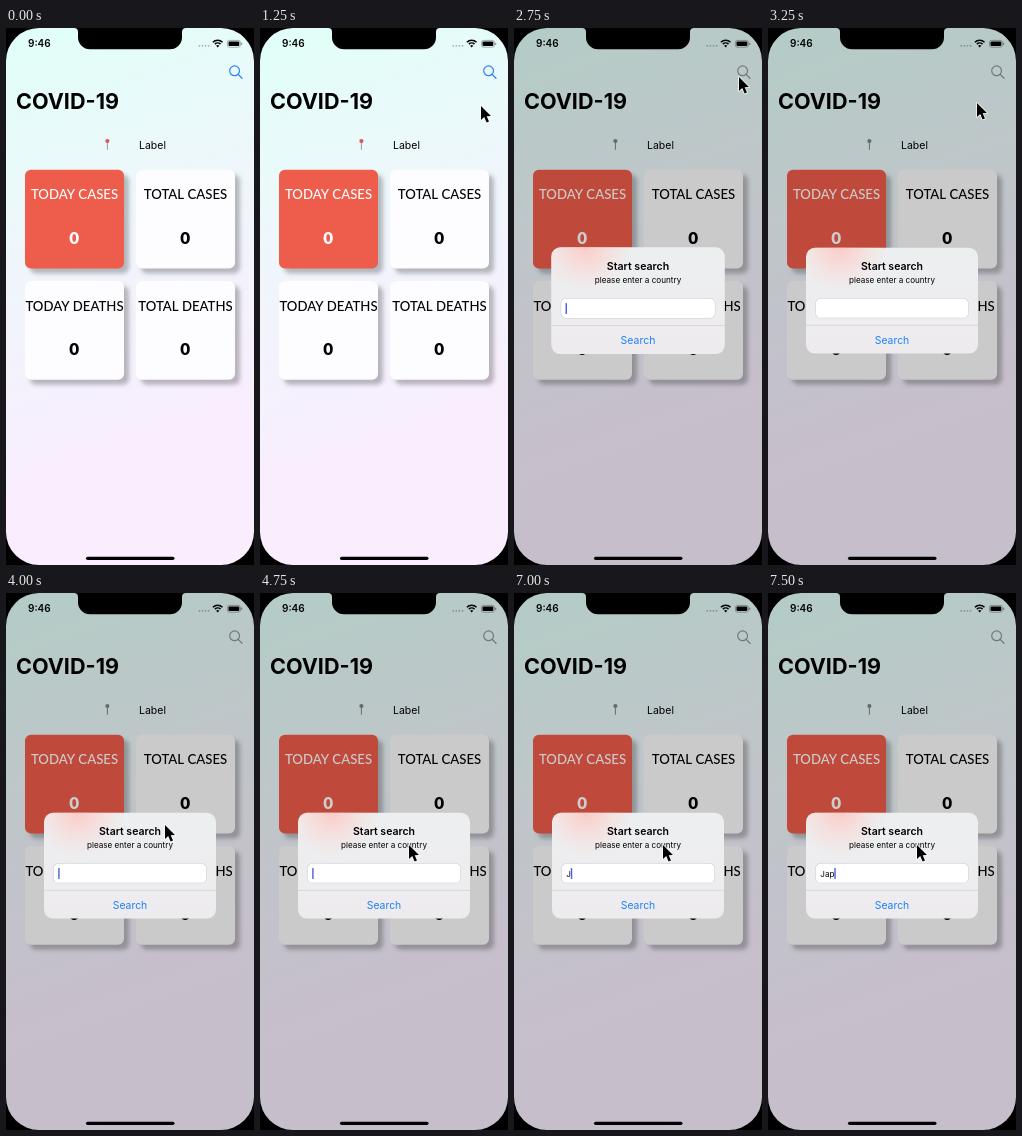
These frames come from a looping animation (248 by 537 pixels, 8 s). An HTML page with a canvas:

```html
<!DOCTYPE html>
<html lang="en">
<head>
<meta charset="utf-8">
<title>Case counter</title>
<style>
  html, body { margin: 0; width: 100%; height: 100%; overflow: hidden; background: #000; }
  canvas { display: block; width: 248px; height: 537px; }
</style>
</head>
<body>
<canvas id="stage"></canvas>
<script>
const W = 248, H = 537, LOOP = 8000, TICK = 250;
const canvas = document.getElementById('stage');
const ctx = canvas.getContext('2d');
const ratio = window.devicePixelRatio || 1;
canvas.width = W * ratio;
canvas.height = H * ratio;

const SANS = 'Inter, Roboto, sans-serif';
const GEOMETRIC = 'Lato, Inter, sans-serif';
const BLUE = '#1a82fb';

// time, x, y of the pointer tip
const POINTER = [
  [750, 196, 300], [1000, 208, 165], [1250, 221, 78], [1500, 225, 52], [1750, 225, 49],
  [3000, 221, 56], [3250, 209, 75], [3500, 203, 83], [3750, 201, 86],
  [4000, 159, 232], [4250, 152, 246], [4500, 149, 252]
];
const KEYS = [[7000, 'J'], [7250, 'Ja'], [7500, 'Jap']];

const latest = (list, t) => list.filter(item => item[0] <= t).pop();

function text(str, x, y, font, color = '#000', align = 'left') {
  ctx.font = font;
  ctx.fillStyle = color;
  ctx.textAlign = align;
  ctx.fillText(str, x, y);
}

function box(x, y, w, h, r, fill) {
  ctx.beginPath();
  ctx.roundRect(x, y, w, h, r);
  ctx.fillStyle = fill;
  ctx.fill();
}

function disc(x, y, r, fill) {
  ctx.beginPath();
  ctx.arc(x, y, r, 0, 7);
  ctx.fillStyle = fill;
  ctx.fill();
}

function line(x1, y1, x2, y2, color, width) {
  ctx.beginPath();
  ctx.moveTo(x1, y1);
  ctx.lineTo(x2, y2);
  ctx.strokeStyle = color;
  ctx.lineWidth = width;
  ctx.stroke();
}

function background() {
  const g = ctx.createLinearGradient(0, 0, 150, 420);
  g.addColorStop(0, '#e0fff8');
  g.addColorStop(0.45, '#eef7fb');
  g.addColorStop(1, '#f9edfe');
  ctx.fillStyle = g;
  ctx.fillRect(0, 0, W, H);
}

function statusBar() {
  text('9:46', 22, 19.3, `600 10px ${SANS}`);
  for (let i = 0; i < 4; i++) disc(193.3 + i * 3.1, 17.8, 0.9, '#a3afb2');
  ctx.strokeStyle = '#000';
  ctx.lineWidth = 1.6;
  for (const r of [4, 6.8]) {
    ctx.beginPath();
    ctx.arc(211.7, 19, r, -Math.PI * 0.75, -Math.PI * 0.25);
    ctx.stroke();
  }
  ctx.beginPath();
  ctx.moveTo(211.7, 19.4);
  ctx.arc(211.7, 19.4, 2.2, -Math.PI * 0.75, -Math.PI * 0.25);
  ctx.fillStyle = '#000';
  ctx.fill();
  ctx.beginPath();
  ctx.roundRect(221.4, 12.4, 13, 6.8, 2);
  ctx.strokeStyle = '#838b8c';
  ctx.lineWidth = 0.7;
  ctx.stroke();
  box(222.5, 13.5, 10.8, 4.6, 1, '#000');
  box(235.2, 14.5, 1, 2.6, 0.5, '#838b8c');
}

function searchIcon(color, alpha) {
  ctx.save();
  ctx.globalAlpha = alpha;
  ctx.lineCap = 'round';
  ctx.beginPath();
  ctx.arc(228.6, 42.8, 4.9, 0, 7);
  ctx.strokeStyle = color;
  ctx.lineWidth = 1.2;
  ctx.stroke();
  line(232.2, 46.4, 236, 50.2, color, 1.3);
  ctx.restore();
}

function pin(muted) {
  line(101.4, 114, 101.4, 121.8, muted ? '#7d8587' : '#a6969b', 1);
  disc(101.4, 113, 2.1, muted ? '#7d8587' : '#e2544f');
}

function card(x, y, label, fill = '#fdfcfe', ink = '#000') {
  ctx.save();
  ctx.shadowColor = 'rgba(0,0,0,.25)';
  ctx.shadowBlur = 4 * ratio;
  ctx.shadowOffsetX = ctx.shadowOffsetY = 5 * ratio;
  box(x, y, 99, 98.7, 6, fill);
  ctx.restore();
  text(label, x + 49.5, y + 29.5, `500 13.2px ${GEOMETRIC}`, ink, 'center');
  text('0', x + 49.3, y + 74.3, `900 17px ${GEOMETRIC}`, ink, 'center');
}

function page(t, dimmed) {
  background();
  statusBar();
  searchIcon(dimmed ? '#8f979a' : '#2f80f5', t === 2000 ? 0.35 : 1);
  text('COVID-19', 10, 81.3, `700 21.6px ${SANS}`);
  pin(dimmed);
  text('Label', 133, 120.8, `10.5px ${SANS}`);
  card(19, 141.8, 'TODAY CASES', '#ee5c4b', '#fff');
  card(130, 141.8, 'TOTAL CASES');
  card(19, 253, 'TODAY DEATHS');
  card(130, 253, 'TOTAL DEATHS');
}

function caretAlpha(t) {
  if (t >= 7000) return 1;
  return { 250: 0, 500: 0.4 }[t % 1000] ?? 1;
}

function dialog(t) {
  ctx.save();
  const scale = t === 2750 ? 1.009 : 1;
  ctx.translate(124, 272.7);
  ctx.scale(scale, scale);
  ctx.translate(-124, -272.7);

  const base = ctx.createLinearGradient(0, 220, 0, 325);
  base.addColorStop(0, '#eceff0');
  base.addColorStop(1, '#eeebef');
  box(38, 219.8, 172, 105.8, 9, base);
  const glow = ctx.createRadialGradient(72, 217, 4, 72, 217, 48);
  glow.addColorStop(0, 'rgba(255,196,190,.8)');
  glow.addColorStop(1, 'rgba(255,215,210,0)');
  box(38, 219.8, 172, 105.8, 9, glow);

  text('Start search', 124, 242.4, `600 10.5px ${SANS}`, '#000', 'center');
  text('please enter a country', 124, 255.2, `8.1px ${SANS}`, '#000', 'center');
  box(47.3, 270.3, 153.4, 20, 5, '#cfcdd1');
  box(47.8, 270.8, 152.4, 19, 4.6, '#fff');
  line(38, 297.3, 210, 297.3, '#d0ced2', 0.7);
  text('Search', 124, 316, `10.4px ${SANS}`, BLUE, 'center');

  const typed = latest(KEYS, t)?.[1] ?? '';
  text(typed, 52.3, 283.6, `8.1px ${SANS}`);
  ctx.globalAlpha = caretAlpha(t);
  box(52.2 + ctx.measureText(typed).width, 275, 1.4, 11, 0.6, '#4360dd');
  ctx.restore();
}

function bezel() {
  ctx.fillStyle = '#000';
  ctx.beginPath();
  ctx.rect(0, 0, W, H);
  ctx.roundRect(0, 0, W, H, 33);
  ctx.fill('evenodd');
  ctx.beginPath();
  ctx.moveTo(68, 0);
  ctx.quadraticCurveTo(72, 0, 72, 4);
  ctx.lineTo(72, 9);
  ctx.arcTo(72, 21.3, 85, 21.3, 12);
  ctx.lineTo(164, 21.3);
  ctx.arcTo(176, 21.3, 176, 9, 12);
  ctx.lineTo(176, 4);
  ctx.quadraticCurveTo(176, 0, 180, 0);
  ctx.fill();
  box(80, 528.7, 88.5, 3.2, 1.6, '#000');
}

function pointer(x, y) {
  const outline = [[0, 0], [0, 14], [3.2, 11.1], [5.6, 16.6], [8, 15.6], [5.7, 10.2], [10, 10]];
  ctx.beginPath();
  for (const [dx, dy] of outline) ctx.lineTo(x + dx, y + dy);
  ctx.closePath();
  ctx.lineJoin = 'round';
  ctx.strokeStyle = '#fff';
  ctx.lineWidth = 1.4;
  ctx.stroke();
  ctx.fillStyle = '#000';
  ctx.fill();
}

function draw(now) {
  const t = Math.floor((now % LOOP) / TICK) * TICK;
  const dimmed = t >= 2750;
  ctx.setTransform(ratio, 0, 0, ratio, 0, 0);
  page(t, dimmed);
  if (dimmed) {
    ctx.fillStyle = 'rgba(0,0,0,.2)';
    ctx.fillRect(0, 0, W, H);
    dialog(t);
  }
  bezel();
  const spot = latest(POINTER, t);
  if (spot) pointer(spot[1], spot[2]);
}

const start = performance.now();
function loop() {
  draw(performance.now() - start);
  requestAnimationFrame(loop);
}
loop();
</script>
</body>
</html>
```
